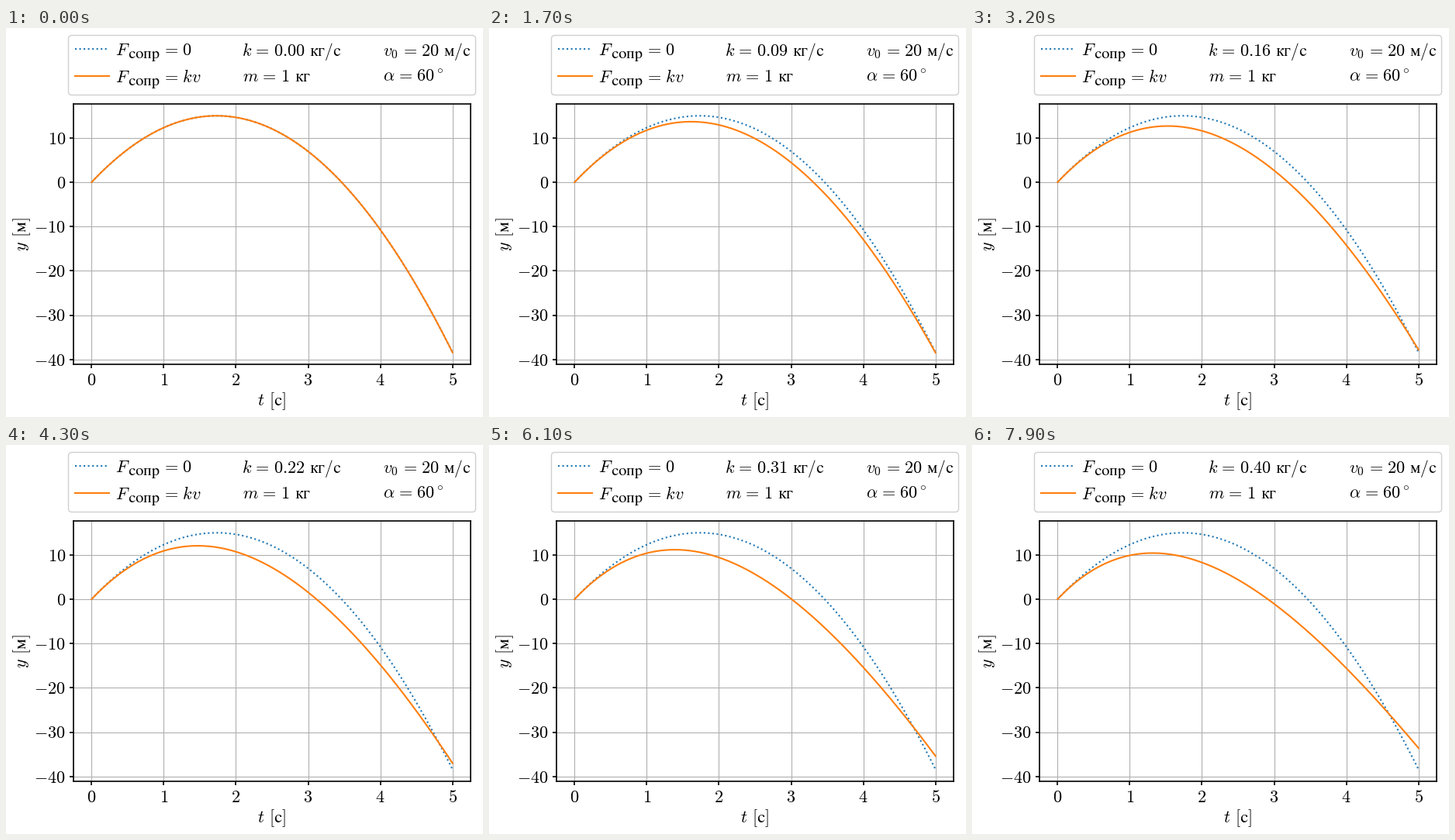
A matplotlib script that plays this animation: 615 by 502 pixels, repeating every 8 s.

```python
import numpy as np
import matplotlib.pyplot as plt
from matplotlib.animation import FuncAnimation
from matplotlib.patches import FancyBboxPatch

W, H, DPI = 615, 502, 100
FRAMES, INTERVAL = 80, 100
K_STEP = 1 / 199
V0, ALPHA, M, G = 20, np.radians(60), 1, 10
BLUE, ORANGE = "#1f77b4", "#ff7f0e"
LEFT, RIGHT, TOP, BOTTOM = 87, 599, 98, 434
EQ = r"\hspace{0.117}=\hspace{0.117}"
SPACE = r"\hspace{0.379}"

plt.rcParams["mathtext.fontset"] = "cm"


def height(t, k):
    vy = V0 * np.sin(ALPHA)
    if k == 0:
        return vy * t - G * t**2 / 2
    drift = M * G / k
    return M / k * (vy + drift) * (1 - np.exp(-k * t / M)) - drift * t


fig = plt.figure(figsize=((W + 0.001) / DPI, (H + 0.001) / DPI), dpi=DPI, facecolor="white")
ax = fig.add_axes([LEFT / W, 1 - BOTTOM / H, (RIGHT - LEFT) / W, (BOTTOM - TOP) / H])

# Pixel-space overlay for the legend and all labels
stage = fig.add_axes([0, 0, 1, 1])
stage.set(xlim=(0, W), ylim=(H, 0))
stage.axis("off")


def label(x, y, tex, size=16, ha="left", **kw):
    return stage.text(x, y, f"${tex}$", fontsize=size, ha=ha, va="baseline", **kw)


def word(x, y, text, size=15.5):
    return label(x, y, rf"\mathrm{{{text}}}", size)


t = np.linspace(0, 5, 200)
free = height(t, 0)
ax.plot(t, free, ":", color=BLUE, lw=1.5)
curve, = ax.plot(t, free, color=ORANGE, lw=1.5)
pad = 0.05 * np.ptp(free)
y_min, y_max = free.min() - pad, free.max() + pad
ax.set(xlim=(-0.25, 5.25), ylim=(y_min, y_max),
       xticks=range(6), yticks=range(-40, 11, 10))
ax.grid(color="#b0b0b0", lw=0.8)
ax.set_axisbelow(True)
ax.tick_params(length=3.5, width=1.2, labelbottom=False, labelleft=False)
for spine in ax.spines.values():
    spine.set_linewidth(1.2)

for n in range(6):
    label(LEFT + (n + 0.25) / 5.5 * (RIGHT - LEFT), 461, n, ha="center")
for n in range(-40, 11, 10):
    y = TOP + (y_max - n) / (y_max - y_min) * (BOTTOM - TOP)
    label(77, y + 7.7, n, ha="right")
label(343, 487, rf"t{SPACE}\mathrm{{[с]}}", ha="center")
stage.text(26, 266.5, rf"$y{SPACE}\mathrm{{[м]}}$", fontsize=16, rotation=90,
           rotation_mode="anchor", ha="center", va="baseline")

stage.add_patch(FancyBboxPatch((80.5, 9.5), 525, 77, boxstyle="round,pad=0,rounding_size=4.4",
                               fc="white", ec="#d0d0d0", lw=1))
for y, color, style, value in ((27, BLUE, ":", "0"), (62, ORANGE, "-", "kv")):
    stage.plot([89, 133.4], [y, y], style, color=color, lw=1.5)
    base = y + 7.8
    label(141, base, "F")
    word(157, base + 3.7, "сопр", 14.7)
    label(198, base, EQ + value)

k_label = label(304, 36, "")
word(391.3, 36, "кг/с")
label(304.5, 68.7, f"m{EQ}1")
word(371.5, 68.7, "кг")
label(485.5, 36, f"v_0{EQ}20")
word(564, 36, "м/с")
label(485.5, 68.7, rf"\alpha{EQ}60^\circ")


def update(frame):
    k = frame * K_STEP
    curve.set_ydata(height(t, k))
    k_label.set_text(f"$k{EQ}{k:.2f}$")
    return curve, k_label


anim = FuncAnimation(fig, update, frames=FRAMES, interval=INTERVAL, repeat=True, repeat_delay=0)
plt.show()
```
